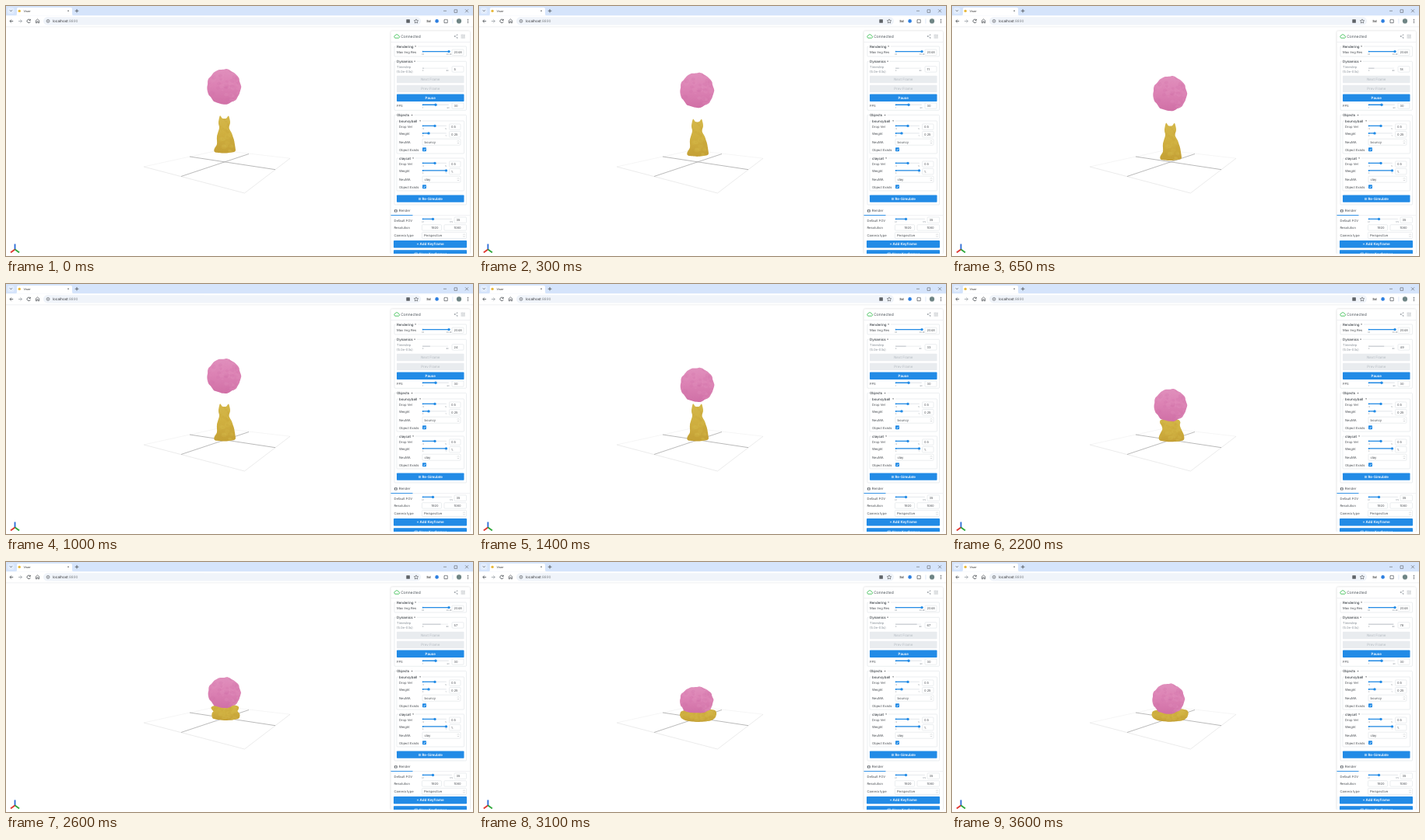
An HTML page with a canvas for the animation above (3.65 s loop, 600 px wide and 322 px high).

```html
<!DOCTYPE html>
<html lang="en">
<head>
<meta charset="utf-8">
<title>Viser</title>
<style>
  html, body { margin: 0; width: 100%; height: 100%; overflow: hidden; background: #fff; }
  canvas, svg { position: absolute; left: 0; top: 0; width: 600px; height: 322px; display: block; }
  text { font-family: Inter, sans-serif; white-space: pre; text-rendering: geometricPrecision; }
</style>
</head>
<body>
<canvas id="scene" width="600" height="322"></canvas>
<svg id="ui" viewBox="0 0 600 322"></svg>
<script>
const LOOP = 3650, STEP = 50;
const BLUE = '#228be6', INK = '#4a4e53', LINE = '#dee2e6';

// ---------- Interface ----------
const out = [];
const rect = (x, y, w, h, fill, extra = '') =>
  out.push(`<rect x="${x}" y="${y}" width="${w}" height="${h}" fill="${fill}" ${extra}/>`);
const disc = (x, y, r, fill, extra = '') =>
  out.push(`<circle cx="${x}" cy="${y}" r="${r}" fill="${fill}" ${extra}/>`);
const stroke = (d, color = INK, w = 0.8) =>
  out.push(`<path d="${d}" fill="none" stroke="${color}" stroke-width="${w}"/>`);
const text = (x, y, s, size = 4.15, fill = INK, extra = '') =>
  out.push(`<text x="${x}" y="${y}" font-size="${size}" fill="${fill}" ${extra}>${s}</text>`);

const MID = 'text-anchor="middle"', BOLD = 'font-weight="600"';
const frame = (x, y, w, h) => rect(x, y, w, h, '#fff', `rx="1" stroke="${LINE}" stroke-width=".6"`);

function field(x, y, w, value, id = '') {
  frame(x, y, w, 7.4);
  text(x + 2.6, y + 5.2, value, 4, INK, id && `id="${id}"`);
}

function slider(x1, x2, y, pos, lo, hi) {
  rect(x1, y - 0.7, x2 - x1, 1.4, '#e9ecef', 'rx=".7"');
  rect(x1, y - 0.7, pos - x1, 1.4, BLUE, 'rx=".7"');
  disc(x1 + 0.6, y, 0.9, BLUE);
  disc(pos, y, 1.7, BLUE);
  text(x1 + 0.6, y + 4.4, lo, 2.6, '#868e96', MID);
  text(x2 - 1, y + 4.4, hi, 2.6, '#868e96', MID);
}

function select(x, y, w, value) {
  frame(x, y, w, 8);
  text(x + 2.4, y + 5.4, value, 4.2);
  const cx = x + w - 3;
  stroke(`M${cx - 1} ${y + 3.3}l1-1 1 1m0 1.6l-1 1-1-1`, '#868e96', 0.4);
}

function button(x, y, w, label, off = false) {
  rect(x, y - 0.2, w, 9.4, off ? '#e9ecef' : BLUE, 'rx=".8"');
  text(x + w / 2, y + 6.1, label, 4.5, off ? '#b4bac1' : '#fff', MID + (off ? '' : ' ' + BOLD));
}

function group(x, y, w, h, label, labelW) {
  frame(x, y, w, h);
  rect(x + 2, y - 2, labelW + 6, 4, '#fff');
  text(x + 3, y + 1.7, label, 4.4, '#343a40', 'font-weight="500"');
  out.push(`<path d="M${x + labelW + 4} ${y - 0.5}h2.2l-1.100 1.300z" fill="${INK}"/>`);
}

function check(y) {
  rect(535, y, 5, 5, BLUE, 'rx=".8"');
  stroke(`M536.3 ${y + 2.6}l1 1 1.7-2`, '#fff', 0.7);
}

function browser() {
  rect(0, 0, 600, 12.5, '#d5e4fb');
  rect(2, 2, 8.5, 8, '#e3edfd', 'rx="2.5"');
  stroke('M5 5.4l1.4 1.4 1.4-1.4');
  out.push('<path d="M12 12.5q2 0 2-2V4q0-2 2-2h67q2 0 2 2v6.500q0 2 2 2z" fill="#fff"/>');
  disc(17.2, 6.4, 1.7, '#e8b93c');
  text(22.6, 7.8, 'Viser', 3.7, '#333');
  disc(80, 6.3, 0.8, INK);
  stroke('M88.700 6.300h4.600m-2.300-2.300v4.600');
  stroke('M562 6.300h4M590 4.300l4 4m0-4l-4 4', '#444', 0.5);
  stroke('M576 4.800h3.600v3.600H576z', '#444', 0.5);

  rect(0, 12.5, 600, 14.5, '#fff');
  rect(0, 26.6, 600, 0.6, '#e3e5e8');
  rect(48, 14.3, 485, 10.2, '#f0f4fa', 'rx="5"');
  stroke('M9.200 19.500H5m2-2.100l-2.100 2.100 2.100 2.100');
  stroke('M16 19.500h4.300m-2-2.100l2.100 2.100-2.100 2.100', '#9aa0a6');
  stroke('M31 18.200a2.200 2.200 0 1 0 .3 1.900M31.300 16.800v1.700h-1.700');
  stroke('M38.300 21.800v-3l2.200-1.900 2.200 1.900v3h-1.500v-2h-1.400v2z', INK, 0.7);
  disc(54, 19.4, 1.9, 'none', `stroke="${INK}" stroke-width=".6"`);
  stroke('M54 19v1.400m0-2.300v.5', INK, 0.6);
  text(60, 21.2, 'localhost<tspan fill="#80868b">:8890</tspan>', 4.6, '#303134');
  rect(514.3, 17.2, 4.6, 4.6, '#5f6368', 'rx=".6"');
  stroke('M527 16.900l.8 1.700 1.900.2-1.400 1.300.4 1.900-1.700-1-1.700 1 .4-1.900-1.400-1.300 1.900-.2z', INK, 0.6);
  text(543, 21, 'Sd', 4.2, '#333', MID + ' ' + BOLD);
  disc(553.6, 19.4, 2.3, '#2d7fe0');
  stroke('M563 17.700h1.300q.8-1.600 1.600 0h1.300v4H563z', INK, 0.7);
  rect(573.7, 16.5, 0.5, 6, '#bdd1f0');
  disc(582, 19.4, 3.1, '#6f8585');
  for (const y of [17.4, 19.4, 21.4]) disc(593.5, y, 0.6, INK);
}

function panel() {
  rect(494.5, 32.3, 101.5, 286.7, '#fff', 'rx="1.5" style="filter:drop-shadow(0 0 1.2px #0003)"');
  out.push('<path d="M500 41.200a1.700 1.700 0 0 1 .2-3.300 2.200 2.200 0 0 1 4.100.4 1.500 1.500 0 0 1 .2 2.900z" fill="none" stroke="#40c057" stroke-width=".9"/>');
  text(507.3, 41, 'Connected', 4.9, '#495057');
  stroke('M579.800 37.200l-3.300 1.800 3.300 1.900', '#868e96', 0.4);
  for (const [x, y] of [[579.8, 37.1], [576.4, 39], [579.8, 41]]) disc(x, y, 0.7, '#868e96');
  stroke('M584.500 37.400h1.500m1.600 0h2.200M584.500 39.200h3m1.500 0h.8M584.500 41h.8m1.600 0h2.900M586.800 36.600v1.600m1.500.2v1.600m-2.200.2v1.600', '#868e96', 0.5);
  rect(494.5, 46, 101.5, 0.6, '#e4e7eb');

  group(499, 52, 92.5, 13, 'Rendering', 22);
  text(502, 60.6, 'Max Img Res');
  slider(535, 570, 58.6, 569, '32', '2048');
  field(573, 56, 15, '2048');

  group(499, 71.3, 92.5, 63, 'Dynamics', 21);
  text(502, 80, 'Timestep', 4.15, '#868e96');
  text(502, 85.800, '(5.0e-03s)', 4.15, '#868e96');
  rect(535, 79.7, 33, 0.9, '#e9ecef');
  rect(535, 79.7, 2, 0.9, '#b9bec4', 'id="progress"');
  text(535.5, 84, '0', 2.6, '#868e96', MID);
  text(567, 84, '80', 2.6, '#868e96', MID);
  field(573, 77.7, 15, '5', 'counter');
  button(502, 90, 86.5, 'Next Frame', true);
  button(502, 102, 86.5, 'Prev Frame', true);
  button(502, 113.8, 86.5, 'Pause');
  text(502, 130.1, 'FPS');
  slider(535, 569, 127.3, 552, '1', '60');
  field(573, 124.8, 15, '30');

  group(499, 140.4, 92.5, 115.6, 'Objects', 17.5);
  object(148, 'bouncyball', 25, 543, '0.25', 'bouncy');
  object(196, 'claycat', 16, 565.5, '1.', 'clay');
  button(502, 243.6, 86.5, '⊙ Re-Simulate');

  rect(494.5, 269.6, 101.5, 0.5, LINE);
  rect(494.5, 269, 28, 0.9, BLUE);
  rect(498.8, 262.2, 4, 3.2, '#6c7278', 'rx=".7"');
  disc(500.8, 263.9, 0.9, '#fff');
  text(504.7, 265.3, 'Render', 4.4);
  text(498.5, 277.6, 'Default FOV');
  slider(535, 573, 274.4, 548.5, '0.1', '175');
  field(576, 272, 15.5, '35');
  text(498.5, 287.1, 'Resolution');
  field(534.5, 281.7, 25, '');
  field(563, 281.7, 28.5, '');
  text(551, 287, '1920', 4, INK, MID);
  text(580, 287, '1080', 4, INK, MID);
  text(498.5, 296.9, 'Camera type');
  select(534.5, 291.4, 57, 'Perspective');
  button(498, 302.3, 94, '+ Add Keyframe');
  button(498, 314.4, 94, '⌫ Clear Keyframes');
  rect(490, 319, 110, 3, '#fff');
}

function object(y, name, labelW, weightX, weight, material) {
  group(502, y, 86.5, 42, name, labelW);
  text(505, y + 8.8, 'Drop Vel');
  slider(535, 566, y + 6.4, 551, '-5', '5');
  field(569.5, y + 4, 14.5, '0.5');
  text(505, y + 18.4, 'Weight');
  slider(535, 566, y + 15.9, weightX, '0', '1');
  field(569.5, y + 13.5, 14.5, weight);
  text(505, y + 28.8, 'NeuMA');
  select(535, y + 23.2, 49, material);
  text(505, y + 38.5, 'Object Exists');
  check(y + 34.3);
}

function axes() {
  stroke('M11.500 314V306.500', '#2f6fd8', 1.9);
  stroke('M11.500 313.500L6 317.500', '#e0352f', 1.9);
  stroke('M11.500 313.500L17 317.500', '#2fa83a', 1.9);
}

browser();
panel();
axes();
document.getElementById('ui').innerHTML = out.join('');
const counter = document.getElementById('counter');
const progress = document.getElementById('progress');

// ---------- Motion ----------
const mix = (a, b, k) => a + (b - a) * k;

// Each key is [time, value, value, ...]
function span(keys, t) {
  let i = 0;
  while (i < keys.length - 2 && t >= keys[i + 1][0]) i++;
  const k = (t - keys[i][0]) / (keys[i + 1][0] - keys[i][0]);
  return [i, Math.min(1, Math.max(0, k))];
}

function linear(keys, t) {
  const [i, k] = span(keys, t);
  return keys[i].slice(1).map((v, j) => mix(v, keys[i + 1][j + 1], k));
}

function smooth(keys, t) {
  const [i, k] = span(keys, t);
  const at = n => keys[Math.min(keys.length - 1, Math.max(0, n))];
  const a = at(i), b = at(i + 1), p = at(i - 1), n = at(i + 2), dt = b[0] - a[0];
  return a.slice(1).map((v, j) => {
    const c = j + 1;
    const m0 = (b[c] - p[c]) / (b[0] - p[0]) * dt, m1 = (n[c] - a[c]) / (n[0] - a[0]) * dt;
    const k2 = k * k, k3 = k2 * k;
    return (2 * k3 - 3 * k2 + 1) * v + (k3 - 2 * k2 + k) * m0 + (3 * k2 - 2 * k3) * b[c] + (k3 - k2) * m1;
  });
}

const COUNT = [[0, 5], [300, 11], [1000, 24], [1800, 41], [2600, 57], [3100, 67], [3600, 78]];
// centre x, centre y, radius x, radius y
const BALL = [
  [0, 280, 104, 22, 23], [300, 280, 108.5, 22, 22.8], [1000, 280, 118.5, 22, 22.6],
  [1800, 280.5, 143, 21.7, 21.8], [2600, 280.5, 168.3, 21.2, 20],
  [3100, 279.5, 177.5, 21.7, 17], [3600, 278, 176.2, 21, 19.8],
];

// Cat outline, clockwise from the left ear
const sitting = [275,154.3, 278,157.7, 283,157.7, 286,154.5, 288,163, 286.5,170, 290,177, 293,186, 294.5,195,
  294,200.5, 282,202.5, 269,201.5, 267.5,197.5, 271,191, 271,181, 274,170, 273,163];
const pressed = [270.5,165, 275,163.5, 281,164, 286,165, 287.5,169, 287,173.5, 290,179, 293,186, 295.5,193,
  296,200.5, 282,202.5, 268.5,201.5, 267,197, 271,190, 274,182, 274,175, 271,170];
const crushed = [265,186, 272,184, 284,183, 296,185, 299,187, 298.5,190, 297.5,192, 299,194, 300.5,197,
  298,202, 282,204, 267,202, 264.5,198, 265,194, 266.5,192.5, 265,190.5, 263.5,188];
const flat = [261,192, 270,190, 288,189, 301,190.5, 304,192, 305,194, 305,196, 304.5,198, 303,201,
  297,204.5, 281,206, 267,204.5, 260.5,201.5, 258.5,198.5, 258,196.5, 258.5,195, 259,193.5];
const settled = flat.map((v, i) => v - (i % 2 ? 0.2 : 1.5));
const CAT = [[0, ...sitting], [1450, ...sitting], [1800, ...pressed], [2600, ...crushed], [3100, ...flat], [3600, ...settled]];

// ---------- Scene ----------
const ctx = document.getElementById('scene').getContext('2d');

let seed = 7;
const rnd = () => (seed = (seed * 16807) % 2147483647) / 2147483647;
const specks = n => Array.from({ length: n }, () =>
  ({ x: rnd() * 2 - 1, y: rnd() * 2 - 1, r: 0.8 + rnd() * 2, light: rnd() > 0.5 }));
const ballSpecks = specks(90), catSpecks = specks(70);

function segment(x1, y1, x2, y2, color, w) {
  ctx.strokeStyle = color;
  ctx.lineWidth = w;
  ctx.beginPath();
  ctx.moveTo(x1, y1);
  ctx.lineTo(x2, y2);
  ctx.stroke();
}

function ground() {
  const back = '#f1f1f1', edge = '#e6e6e6', axis = '#a8a8a8';
  segment(177, 207, 274, 185.7, back, 0.7);
  segment(274, 185.7, 365, 196.2, back, 0.7);
  segment(177, 207, 306.5, 241, edge, 0.8);
  segment(306.5, 241, 365, 196.2, edge, 0.8);
  segment(236, 194, 346, 210.7, axis, 0.8);
  segment(225, 219.5, 312, 190.5, axis, 0.8);
}

function curve(p) {
  const n = p.length / 2, X = i => p[((i + n) % n) * 2], Y = i => p[((i + n) % n) * 2 + 1];
  const path = new Path2D();
  path.moveTo(X(0), Y(0));
  for (let i = 0; i < n; i++) {
    path.bezierCurveTo(
      X(i) + (X(i + 1) - X(i - 1)) / 7, Y(i) + (Y(i + 1) - Y(i - 1)) / 7,
      X(i + 1) - (X(i + 2) - X(i)) / 7, Y(i + 1) - (Y(i + 2) - Y(i)) / 7,
      X(i + 1), Y(i + 1));
  }
  path.closePath();
  return path;
}

// Shaded body with soft mottling
function body(path, [cx, cy, rx, ry], [light, base, dark], marks) {
  const g = ctx.createLinearGradient(0, cy - ry, 0, cy + ry);
  g.addColorStop(0, light);
  g.addColorStop(0.45, base);
  g.addColorStop(1, dark);
  ctx.save();
  ctx.fillStyle = g;
  ctx.fill(path);
  ctx.clip(path);
  ctx.globalAlpha = 0.25;
  for (const m of marks) {
    ctx.fillStyle = m.light ? light : dark;
    ctx.beginPath();
    ctx.ellipse(cx + m.x * rx, cy + m.y * ry, m.r * 1.3, m.r, m.x, 0, 7);
    ctx.fill();
  }
  ctx.restore();
}

function drawCat(t) {
  const lift = Math.max(0, 13 - t * 0.0145);
  const pts = linear(CAT, t).map((v, i) => i % 2 ? v - lift : v);
  const xs = pts.filter((_, i) => i % 2 === 0), ys = pts.filter((_, i) => i % 2);
  const x1 = Math.min(...xs), x2 = Math.max(...xs), y1 = Math.min(...ys), y2 = Math.max(...ys);
  body(curve(pts), [(x1 + x2) / 2, (y1 + y2) / 2, (x2 - x1) / 2, (y2 - y1) / 2],
    ['#d4b74a', '#d0b040', '#c4a036'], catSpecks);
}

function drawBall(t) {
  const [cx, cy, rx, ry] = smooth(BALL, t);
  const squash = Math.max(0, 1 - ry / rx);
  const pts = [];
  for (let i = 0; i < 40; i++) {
    const a = i * Math.PI / 20, c = Math.cos(a), s = Math.sin(a);
    const r = 0.985 + 0.018 * Math.sin(9 * a + 1) + 0.012 * Math.sin(14 * a + 2);
    // The lower half spreads as the ball is squashed
    const wide = s > 0 ? Math.sign(c) * Math.abs(c) ** (1 - 2 * squash) : c;
    pts.push(cx + wide * r * rx, cy + s * r * ry);
  }
  body(curve(pts), [cx, cy, rx, ry], ['#e08fbc', '#dc82b4', '#d070a6'], ballSpecks);
}

function draw(t) {
  ctx.clearRect(0, 0, 600, 322);
  ground();
  drawCat(t);
  drawBall(t);
  const n = Math.round(linear(COUNT, t)[0]);
  counter.textContent = n;
  progress.setAttribute('width', 33 * n / 80);
}

const start = performance.now();
function tick() {
  const t = (performance.now() - start) % LOOP;
  draw(Math.floor(t / STEP) * STEP);
  requestAnimationFrame(tick);
}
tick();
</script>
</body>
</html>
```
